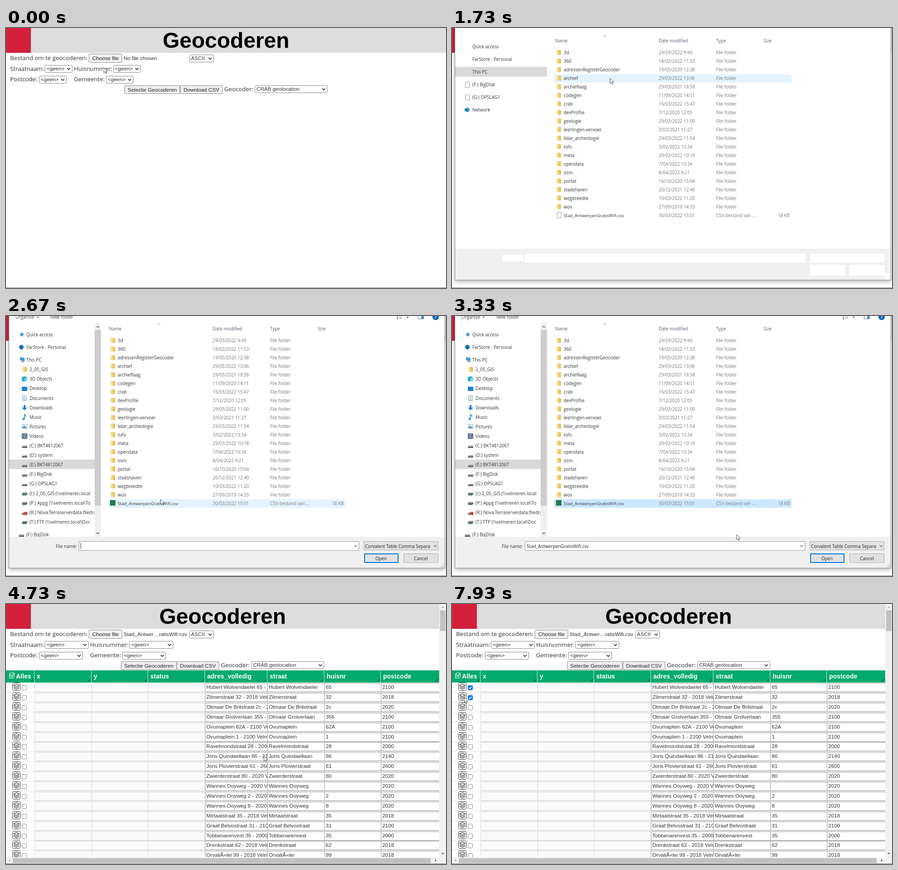
Animation, 973 px wide and 576 px high, one loop 8 s. Source, as an HTML page with a canvas:

```html
<!DOCTYPE html>
<html lang="nl">
<head>
<meta charset="utf-8">
<title>Geocoderen</title>
<style>
html, body { margin: 0; width: 973px; height: 576px; overflow: hidden; background: #fff; }
canvas { display: block; }
</style>
</head>
<body>
<canvas id="stage" width="973" height="576"></canvas>
<script>
const c = document.getElementById('stage').getContext('2d', { alpha: false });
const LOOP = 8000;
const UI = '11.67px "Liberation Sans", Arial, sans-serif';
const LABEL = '13.3px "Open Sans", sans-serif';
const SMALL = '9.9px "Open Sans", sans-serif';

// Pointer path: time, x, y
const path = [
  [0, 216, 88], [70, 216, 88], [330, 226, 67], [530, 226, 67], [1330, 300, 92], [1730, 349, 111],
  [2200, 330, 316], [2270, 330, 316], [2600, 341, 406], [3070, 341, 406], [3500, 815, 535],
  [3600, 815, 535], [3870, 767, 494], [3930, 767, 494], [4200, 680, 430], [4400, 680, 430],
  [4730, 570, 337], [5270, 570, 337], [5870, 128, 126], [6070, 128, 126], [6470, 7, 178],
  [6670, 38, 187], [6870, 38, 187], [7130, 39, 212], [7400, 39, 212], [7530, 37, 207],
  [7929, 37, 207], [7930, 27, 207], [LOOP, 27, 207]
];

const folders = `3d|29/03/2022 9:45
360|18/02/2022 11:53
adressenRegisterGeocoder|19/05/2020 12:38
archief|29/03/2022 13:06
archieflaag|29/03/2021 18:58
codegen|11/09/2020 14:11
crab|15/03/2022 15:47
devProfile|7/12/2020 12:05
geologie|29/03/2022 11:00
leerlingen-vervoer|3/03/2021 11:27
lidar_archeologie|29/03/2022 11:54
lufo|3/02/2022 13:34
meta|29/03/2022 10:18
opendata|7/04/2022 10:34
osm|8/04/2022 9:21
portal|16/10/2020 15:04
stadshaven|20/12/2021 12:40
wegbreedte|10/03/2022 11:20
woii|27/09/2019 14:33
Stad_AntwerpenGratisWifi.csv|30/03/2022 15:01`.split('\n').map(s => s.split('|'));

const places = `folder|2_05_GIS
cube|3D Objects
screen|Desktop
doc|Documents
down|Downloads
note|Music
picture|Pictures
film|Videos
drive|(C:) BKT4812067
drive|(D:) system
drive|(E:) BKT4812067
drive|(F:) BigDisk
drive|(G:) OPSLAG1
net|(I:) 2_05_GIS (\\\\velmeren.local
net|(P:) Appg (\\\\velmeren.local\\To
off|(R:) Nova.Terraserverdata.filedra
net|(T:) FTP (\\\\velmeren.local\\Doc`.split('\n').map(s => s.split('|'));

const addresses = `Hubert Wolvendaelei|65|2100
Zilmerstraat|32|2018
Otmaar De Brilstraat|2c|2020
Otmaar Grolverlaan|355|2100
Ovumaplein|62A|2100
Ovumaplein|1|2100
Ravelmondstraat|28|2000
Joris Quindaellaan|86|2140
Joris Plovierstraat|61|2600
Zwierderstraat|80|2020
Wannes Ooyweg||2020
Wannes Ooyweg|2|2020
Wannes Ooyweg|8|2020
Mirtaalstraat|35|2018
Graaf Belvostraat|31|2100
Tobbenarenvest|35|2000
Drenkstraat|62|2018
OrvaliÃ«lei|99|2018`.split('\n').map(s => s.split('|'));

function fill(x, y, w, h, color) {
  c.fillStyle = color;
  c.fillRect(x, y, w, h);
}

function box(x, y, w, h, color, border, radius = 0) {
  c.beginPath();
  c.roundRect(x + .5, y + .5, w - 1, h - 1, radius);
  c.fillStyle = color;
  c.fill();
  c.lineWidth = 1;
  c.strokeStyle = border;
  c.stroke();
}

function text(s, x, y, font, color = '#000', align = 'left') {
  c.font = font;
  c.fillStyle = color;
  c.textAlign = align;
  c.fillText(s, x, y);
}

function line(points, color, width = 1) {
  c.beginPath();
  for (let i = 0; i < points.length; i += 2) c.lineTo(points[i], points[i + 1]);
  c.lineWidth = width;
  c.strokeStyle = color;
  c.stroke();
}

function shape(points, color) {
  c.beginPath();
  for (let i = 0; i < points.length; i += 2) c.lineTo(points[i], points[i + 1]);
  c.fillStyle = color;
  c.fill();
}

function dot(x, y, r, color) {
  c.beginPath();
  c.arc(x, y, r, 0, 7);
  c.fillStyle = color;
  c.fill();
}

function clipped(x, y, w, h, draw) {
  c.save();
  c.beginPath();
  c.rect(x, y, w, h);
  c.clip();
  draw();
  c.restore();
}

const chevron = (x, y, color, r = 3.5, width = 1.6) => line([x - r, y - r / 2, x, y + r / 2, x + r, y - r / 2], color, width);
const triangle = (x, y, r, color) => shape([x - Math.abs(r), y - r / 2, x + Math.abs(r), y - r / 2, x, y + r / 2], color);

function button(x, y, w, h, label, hover) {
  box(x, y, w, h, hover ? '#e0e0e0' : '#efefef', hover ? '#555' : '#8a8a8a', 1);
  text(label, x + w / 2, y + h / 2 + 4, UI, '#222', 'center');
}

function select(x, y, w, label) {
  box(x, y, w, 17, '#fff', '#858585', 2);
  text(label, x + 4, y + 12, UI, '#333');
  chevron(x + w - 8.5, y + 8.5, '#222');
}

function drawPage(t) {
  const loaded = t >= 4470, width = loaded ? 958 : 973;
  const wide = loaded ? 36 : 0, shift = loaded ? -7.5 : 0;
  fill(0, 0, 973, 576, '#fff');
  fill(0, 0, width, 55, '#ddd');
  fill(0, 0, 55, 55, '#d2203b');
  text('Geocoderen', width / 2, 44, 'bold 48px "Liberation Sans", Arial, sans-serif', '#000', 'center');

  const label = (s, x, y) => text(s, x, y, LABEL, '#333');
  label('Bestand om te geocoderen:', 9, 71);
  button(183, 57, 74, 20, 'Choose file', t >= 250 && t < 3930);
  text(t < 4000 ? 'No file chosen' : 'Stad_Antwer…ratisWifi.csv', 260, 71, UI, '#333');
  select(405, 59, 55, 'ASCII');
  label('Straatnaam:', 9, 95);
  select(86, 82, 61 + wide, '<geen>');
  label('Huisnummer:', 150 + wide, 95);
  select(237 + wide, 82, 61 + wide, '<geen>');
  label('Postcode:', 9, 118);
  select(73, 106, 61 + wide, '<geen>');
  label('Gemeente:', 150 + wide, 118);
  select(221 + wide, 106, 61 + wide, '<geen>');
  button(262 + shift, 127, 123, 19, 'Selectie Geocoderen');
  button(385 + shift, 127, 94, 19, 'Download CSV');
  label('Geocoder:', 482.5 + shift, 140);
  select(550 + shift, 127, 161, 'CRAB geolocation');
  if (loaded) drawTable(t);
  fill(0, 575, 973, 1, '#777');
}

function layersIcon(y) {
  box(14, y, 18, 18, '#fff', '#333', 3);
  line([23, y + 3, 29, y + 6, 23, y + 9, 17, y + 6, 23, y + 3], '#222', 1.1);
  for (const d of [9, 12]) line([17, y + d, 23, y + d + 3, 29, y + d], '#222', 1.1);
}

function checkbox(y, on) {
  box(35, y, 11, 11, on ? '#0075ff' : '#fff', on ? '#0075ff' : '#858585', 2);
  if (on) line([37.5, y + 5.5, 39.7, y + 8, 43.5, y + 3], '#fff', 1.7);
}

function drawTable(t) {
  const edges = [0, 63, 189, 314, 440, 578, 704, 829, 958];
  const heads = ['Alles', 'x', 'y', 'status', 'adres_volledig', 'straat', 'huisnr', 'postcode'];
  fill(0, 147, 958, 27, '#04aa6d');
  heads.forEach((head, i) => {
    text(head, i ? edges[i] + 5 : 22, 165, 'bold 14px "Liberation Sans", Arial, sans-serif', '#fff');
    const right = edges[i + 1];
    if (i < 7) fill(right - 1, 147, 1, 27, '#c9ecdd');
    line([right - 8, 172, right - 2, 166], '#222');
    line([right - 4, 172, right - 2, 170], '#222');
  });
  box(9, 152, 10, 10, '#04aa6d', '#fff', 1);
  line([7.5, 154, 7.5, 164.5, 17, 164.5], '#fff');
  line([11, 157, 13.5, 159.5, 18, 154], '#fff', 1.3);

  clipped(0, 174, 958, 387, () => addresses.forEach(([street, number, postcode], row) => {
    const y = Math.round(174 + row * 21.9);
    fill(0, y + 21, 958, 1, '#e3e3e3');
    layersIcon(y);
    checkbox(y + 6, row === 0 && t >= 6870 || row === 1 && t >= 7400);
    const full = `${street} ${number}${number && ' '}- ${postcode} Velmeren`;
    ['', '', '', full, street, number, postcode].forEach((value, i) => {
      const x = edges[i + 1], w = edges[i + 2] - x;
      const locked = i < 3;
      box(x, y + 1, w + 1, 20, locked ? '#fafafa' : '#fff', locked ? '#d4d4d4' : '#999');
      clipped(x + 2, y, w - 2, 20, () => text(value, x + 3, y + 14, UI, '#333'));
    });
  }));

  fill(958, 0, 15, 575, '#f1f1f1');
  fill(0, 561, 973, 14, '#f1f1f1');
  fill(960, 14, 12, 46, '#c1c1c1');
  fill(15, 563, 924, 11, '#c1c1c1');
  triangle(966, 7, -3, '#a3a3a3');
  triangle(966, 553, 3, '#505050');
  shape([9, 565, 9, 571, 6, 568], '#a3a3a3');
  shape([949, 565, 949, 571, 952, 568], '#505050');
}

// Sidebar icons, centred on x, y
const icons = {
  star(x, y) {
    const points = [];
    for (let i = 0; i < 10; i++) {
      const r = i % 2 ? 2.4 : 6, a = i * Math.PI / 5 - 1.57;
      points.push(x + r * Math.cos(a), y + r * Math.sin(a));
    }
    shape(points, '#2f8fd8');
  },
  round: (x, y) => dot(x, y, 5, '#0f6cbd'),
  pc(x, y) {
    shape([x - 5, y - 6, x + 5, y - 4, x + 5, y + 3, x - 5, y + 1], '#3a9bdc');
    shape([x - 4, y + 3, x + 2, y + 2, x + 6, y + 5, x, y + 6], '#9aa5ad');
  },
  folder(x, y) {
    fill(x - 4, y - 6, 8, 11, '#f5d67b');
    fill(x + 1, y - 5, 4, 10, '#e6bf55');
  },
  cube(x, y) {
    shape([x - 6, y - 4, x + 1, y - 6, x + 6, y - 3, x + 6, y + 4, x, y + 6, x - 6, y + 4], '#24a6d1');
    shape([x, y - 2, x + 6, y - 3, x + 6, y + 4, x, y + 6], '#8bd8ed');
  },
  screen: (x, y) => { fill(x - 6, y - 4, 12, 9, '#1683d8'); fill(x - 6, y + 4, 12, 1, '#075a9c'); },
  doc(x, y) {
    box(x - 5, y - 6, 10, 12, '#fff', '#8c98a3');
    for (const d of [-3, 0, 3]) fill(x - 3, y + d, 6, 1, '#6c9fc8');
  },
  page: (x, y) => box(x - 5, y - 6, 10, 13, '#fff', '#999'),
  down: (x, y) => shape([x - 2, y - 6, x + 2, y - 6, x + 2, y, x + 6, y, x, y + 6, x - 6, y, x - 2, y], '#2b7fd0'),
  note(x, y) { dot(x - 2, y + 4, 2.4, '#1d85dc'); line([x, y + 4, x, y - 6, x + 4, y - 1], '#1d85dc', 1.6); },
  picture(x, y) {
    box(x - 6, y - 5, 12, 10, '#e9f3fa', '#9aa');
    shape([x - 5, y + 3, x - 1, y - 2, x + 5, y + 3], '#3684bd');
  },
  film(x, y) {
    fill(x - 6, y - 6, 12, 12, '#444');
    fill(x - 3, y - 5, 6, 10, '#679ac7');
    for (let i = -5; i < 5; i += 3) { fill(x - 5, y + i, 1, 2, '#fff'); fill(x + 4, y + i, 1, 2, '#fff'); }
  },
  drive(x, y) {
    shape([x - 6, y + 2, x - 3, y, x + 6, y, x + 6, y + 4, x - 6, y + 5], '#999');
    fill(x - 5, y + 3, 11, 2, '#4c4c4c');
  },
  net(x, y) { icons.drive(x, y - 2); fill(x - 5, y + 3, 9, 2, '#4a9b58'); },
  off(x, y) {
    icons.drive(x, y);
    line([x, y - 1, x + 6, y + 6], '#d32020', 2);
    line([x + 6, y - 1, x, y + 6], '#d32020', 2);
  },
  globe(x, y) { dot(x, y, 5, '#3c9bd6'); fill(x - 6, y - 3, 7, 5, '#2877ad'); }
};

function entry(icon, label, iconX, x, y) {
  if (icon) icons[icon](iconX, y);
  text(label, x, y + 3.7, SMALL, '#333');
}

function drawSidebar(ready) {
  const y = i => 118.5 + i * 21.1;
  if (!ready) {
    fill(7, 86, 203, 22, '#d9d9d9');
    [['', 'Quick access'], ['', 'FarStore - Personal'], ['', 'This PC'], ['page', '(F:) BigDisk'],
      ['page', '(G:) OPSLAG1'], ['globe', 'Network']]
      .forEach(([icon, label], i) => entry(icon, label, 34, 45, 41 + i * 28.1));
    return;
  }
  clipped(7, 10, 189, 479, () => {
    fill(7, 318, 189, 21, '#d9d9d9');
    entry('star', 'Quick access', 35, 45, 41);
    entry('round', 'FarStore - Personal', 34, 45, 69);
    entry('pc', 'This PC', 36, 45, 97);
    places.forEach(([icon, label], i) => entry(icon, label, 41, 52, y(i)));
    entry('drive', '(F:) BigDisk', 34, 45, 484);
  });
  fill(196, 15, 14, 474, '#f0f0f0');
  fill(196, 31, 14, 389, '#cdcdcd');
  chevron(203, 24, '#555', -3, 1.3);
  chevron(203, 481, '#555', 3, 1.3);
  text('Organise', 21, 6, SMALL, '#444');
  triangle(70, 3, 2.5, '#444');
  text('New folder', 98, 6, SMALL, '#444');
  for (const d of [-1, 2, 5]) { fill(864, d, 3, 2, '#888'); fill(869, d, 7, 1, '#888'); }
  triangle(888, 3, 2.5, '#333');
  box(911, -5, 13, 12, '#fff', '#777');
  fill(918, -4, 5, 10, '#3b9bdc');
  dot(950, 2, 7, '#0b63b5');
  text('?', 950, 6, 'bold 10px "Open Sans", sans-serif', '#fff', 'center');
}

function drawFooter(ready, selected) {
  fill(7, 489, 963, 69, '#f0f0f0');
  if (!ready) {
    fill(111, 503, 47, 14, '#fff');
    fill(161, 500, 621, 20, '#fff');
    fill(792, 500, 165, 20, '#fff');
    fill(792, 525, 77, 24, '#fff');
    fill(879, 525, 78, 24, '#fff');
    fill(957, 543, 13, 14, '#fff');
    return;
  }
  text('File name:', 157, 513.5, SMALL, '#333', 'right');
  box(161, 499, 620, 21, '#fff', '#8a9aa8');
  if (selected) text(folders[19][0], 165, 513.5, SMALL, '#222');
  else fill(165, 503, 1, 13, '#333');
  chevron(773, 509.5, '#555', 3, 1.1);
  box(791, 499, 165, 20, '#e3e3e3', '#adadad');
  text('Corvalent Table Comma Separa', 794, 513.5, SMALL, '#222');
  chevron(949, 509.5, '#555', 3, 1.1);
  box(792, 526, 76, 21, '#e1e1e1', '#0078d7');
  c.strokeRect(793.5, 527.5, 73, 18);
  text('Open', 829.5, 540.5, SMALL, '#222', 'center');
  box(879, 526, 77, 21, '#e1e1e1', '#adadad');
  text('Cancel', 917.5, 540.5, SMALL, '#222', 'center');
  for (let i = 0; i < 3; i++) for (let j = 0; j <= i; j++) fill(967 - j * 3, 549 + i * 3, 1.5, 1.5, '#aaa');
}

function drawDialog(t) {
  const ready = t >= 1800, selected = t >= 2870;
  c.save();
  c.shadowColor = 'rgba(0,0,0,.3)';
  c.shadowBlur = 9;
  c.shadowOffsetY = 3;
  fill(6, -20, 965, 579, '#888');
  c.restore();
  fill(7, 0, 963, 558, '#fff');
  drawSidebar(ready);
  drawFooter(ready, selected);

  chevron(338, 18, '#777', -3, 1);
  [['Name', 228], ['Date modified', 457], ['Type', 584], ['Size', 689]]
    .forEach(([s, x]) => text(s, x, 31.7, SMALL, '#55606e'));
  const [px, py] = pointer(t - 40);
  const hover = px < 752 ? Math.floor((py - 45) / 18.97) : -1;
  folders.forEach(([name, date], i) => {
    const y = 54.5 + i * 18.97, file = i === 19;
    if (file && selected) fill(226, y - 9, 525, 19, '#cce8ff');
    else if (i === hover) fill(226, y - 9, 525, 19, '#e5f3fd');
    if (!file) icons.folder(236, y);
    else if (ready) fill(230, y - 7, 12, 12, '#1f7a45');
    else icons.page(237, y - 1);
    text(name, 247, y + 3.7, file ? SMALL.replace('9.9', '9.6') : SMALL, '#333');
    text(date, 457, y + 3.7, SMALL, '#777');
    text(file ? 'CSV-bestand van ...' : 'File folder', 584, y + 3.7, SMALL, '#777');
    if (file) text('18 KB', 747, y + 3.7, SMALL, '#777', 'right');
  });
}

function pointer(t) {
  const i = Math.max(1, path.findIndex(p => p[0] > t));
  const [t0, x0, y0] = path[i - 1], [t1, x1, y1] = path[i];
  const k = Math.max(0, (t - t0) / (t1 - t0));
  return [x0 + (x1 - x0) * k, y0 + (y1 - y0) * k];
}

function drawPointer(t) {
  const [x, y] = pointer(t);
  c.save();
  c.translate(x, y);
  c.beginPath();
  c.moveTo(.5, 0);
  for (const [dx, dy] of [[.5, 11], [3, 8.8], [5, 13], [6.8, 12.2], [5, 8.2], [8.5, 8]]) c.lineTo(dx, dy);
  c.closePath();
  c.fillStyle = '#fff';
  c.fill();
  c.lineWidth = 1;
  c.strokeStyle = '#555';
  c.stroke();
  c.restore();
}

function frame() {
  const t = performance.now() % LOOP;
  drawPage(t);
  if (t >= 1400 && t < 3600) drawDialog(t);
  drawPointer(t);
  requestAnimationFrame(frame);
}
frame();
</script>
</body>
</html>
```
